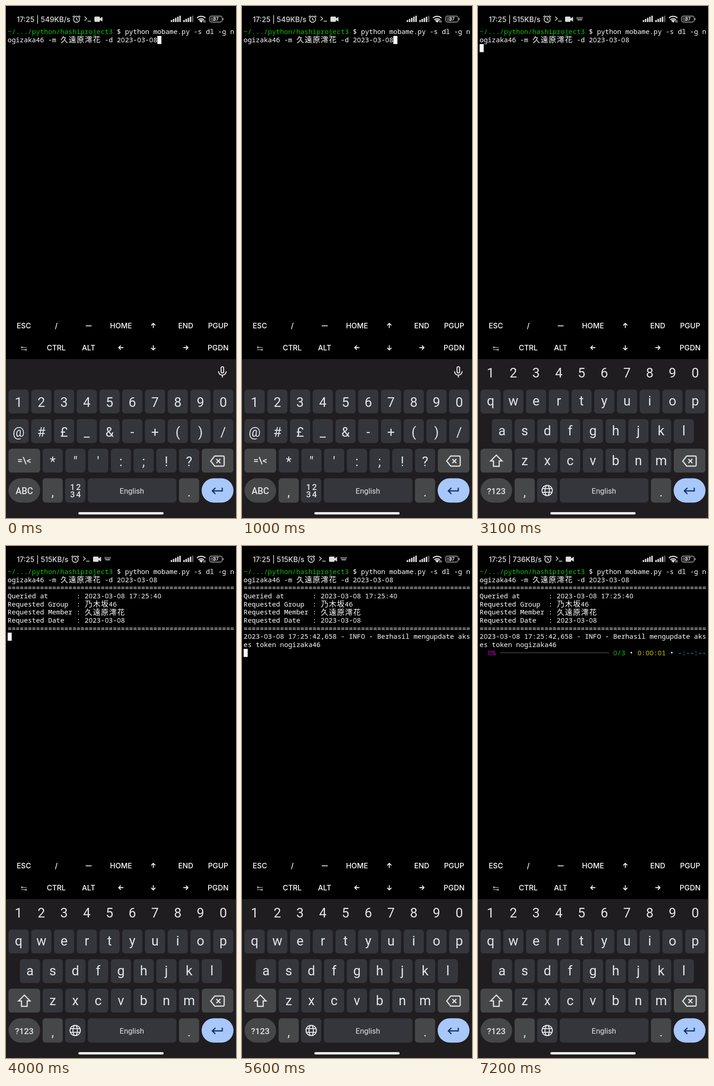
An HTML page with a canvas for the animation above (8000 ms loop, 502 by 1115 pixels).

```html
<!DOCTYPE html>
<html lang="en">
<head>
<meta charset="utf-8">
<title>Terminal session</title>
<style>
html, body { margin: 0; width: 100%; height: 100%; overflow: hidden; background: #000; }
canvas { display: block; }
</style>
</head>
<body>
<canvas id="stage" width="502" height="1115"></canvas>
<script>
const ctx = document.getElementById('stage').getContext('2d');
const LOOP = 8000;
const UI = 'Inter, Roboto, sans-serif';
const KEYS = 'Roboto, sans-serif';
const MONO = '"Noto Sans Mono", "DejaVu Sans Mono", monospace';

const WHITE = '#fff', STATUS = '#dedede', GREEN = '#00cd00';
const KEY = '#35363c', SPECIAL = '#464749', ACCENT = '#a8c7fa', LABEL = '#e3e3e8';

// ---- drawing helpers ----
function text(str, x, y, font, color, align = 'center') {
  ctx.font = font;
  ctx.fillStyle = color;
  ctx.textAlign = align;
  ctx.fillText(str, x, y);
}

function box(x, y, w, h, r, color) {
  ctx.fillStyle = color;
  ctx.beginPath();
  ctx.roundRect(x, y, w, h, r);
  ctx.fill();
}

function frame(x, y, w, h, r, color, width) {
  ctx.strokeStyle = color;
  ctx.lineWidth = width;
  ctx.beginPath();
  ctx.roundRect(x, y, w, h, r);
  ctx.stroke();
}

function line(d, color, width, x = 0, y = 0) {
  ctx.save();
  ctx.translate(x, y);
  ctx.strokeStyle = color;
  ctx.lineWidth = width;
  ctx.stroke(new Path2D(d));
  ctx.restore();
}

function shape(d, color, x = 0, y = 0) {
  ctx.save();
  ctx.translate(x, y);
  ctx.fillStyle = color;
  ctx.fill(new Path2D(d));
  ctx.restore();
}

// ---- status bar ----
function signal(x, lit) {
  for (let i = 0; i < 5; i++) {
    const h = 4.5 + i * 2.4;
    box(x + i * 4.7, 35 - h, 3.2, h, 1, i < lit ? STATUS : '#5c5c5c');
  }
}

function statusBar(speed, typing) {
  const label = `17:25 | ${speed}KB/s`;
  text(label, 23.5, 34.6, `500 15.6px ${UI}`, STATUS, 'left');
  const x = { 549: 154, 515: 151, 736: 152.5 }[speed];

  line('M-6.6 0a6.6 6.6 0 1 0 13.2 0a6.6 6.6 0 1 0 -13.2 0M0 -3.6V.4L2.8 2.2M-8.3 -5L-4.6 -8.2M8.3 -5L4.6 -8.2',
    STATUS, 1.7, x, 29);
  line('M17.5 -5l4.6 4.5l-4.6 4.5M24 5h7.5', STATUS, 1.6, x, 28);
  box(x + 39, 23, 12, 11.5, 1.8, STATUS);
  shape('M50 -1L56.5 -5.2V5.2L50 1z', STATUS, x, 28.7);
  if (typing) {
    line('M64 -2.8h14M64.5 -.2h13M66 2.4h10', '#b4b4b4', 1.7, x, 28);
    line('M67 -4v5M70 -4v5M73 -4v5M76 -4v5', '#000', .7, x, 28);
  }

  signal(359.5, 5);
  signal(387, 4);
  line('M416.8 26.2a13.5 13.5 0 0 1 18.4 0M420 30a9 9 0 0 1 12 0', STATUS, 2.5);
  shape('M421.5 31.8a6.5 6.5 0 0 1 9 0L426 36.2z', STATUS);
  line('M431.7 31v5M434.5 31v5', STATUS, 1.3);

  box(446.3, 24.2, 10.5, 8.6, 2, '#4a4a4a');
  frame(444.2, 22, 27.6, 13, 4, '#b5b5b5', 1.4);
  box(473.2, 26.5, 1.8, 4, 1, '#b5b5b5');
  text('37', 458, 32.3, `600 10px ${UI}`, WHITE);
}

// ---- terminal ----
const CELL = 8.83, ROW = 17.65, LEFT = 3.6, TOP = 47.5;
const NAME = '久遠原澪花';
const RULE = '='.repeat(56);

const command = [
  [['~/.../python/hashiproject3', GREEN], [' $ python mobame.py -s dl -g n']],
  [[`ogizaka46 -m ${NAME} -d 2023-03-08`]]
];
const query = [
  RULE,
  'Queried at       : 2023-03-08 17:25:40',
  'Requested Group  : 乃木坂46',
  'Requested Member : ' + NAME,
  'Requested Date   : 2023-03-08',
  RULE
].map(s => [[s]]);
const info = [
  '2023-03-08 17:25:42,658 - INFO - Berhasil mengupdate aks',
  'es token nogizaka46'
].map(s => [[s]]);
const progress = seconds => [
  ['  0%', '#cd00cd'], [' '], ['━'.repeat(27), '#444'], [' '],
  ['0/3', GREEN], [' • '], ['0:00:0' + seconds, '#cdcd00'], [' • '],
  ['-:--:--', '#00cdcd']
];

function printRow(row, segments) {
  const y = TOP + row * ROW;
  let col = 0;
  for (const [str, color = WHITE] of segments) {
    for (const ch of str) {
      const wide = ch > '\u2e7f';
      const span = wide ? 2 : 1;
      const x = LEFT + col * CELL;
      if (ch === '━') {
        ctx.fillStyle = color;
        ctx.fillRect(x, y + 7.6, CELL, 1.6);
      } else if (ch !== ' ') {
        const font = wide ? '16.4px "Noto Sans CJK JP", "Noto Sans CJK", sans-serif'
          : ch === '0' ? '14.7px "Open Sans", sans-serif'   // plain, undotted zero
          : `14.7px ${MONO}`;
        text(ch, x + span * CELL / 2, y + 13.6 + (wide ? .6 : 0), font, color);
      }
      col += span;
    }
  }
}

function terminal(t) {
  const rows = [...command];
  if (t >= 4000) rows.push(...query);
  if (t >= 5600) rows.push(...info);
  if (t >= 6100) rows.push(progress(t >= 7100 ? 1 : 0));
  rows.forEach((segments, i) => printRow(i, segments));
  if (t < 6100) {
    const [col, row] = t < 2000 ? [37, 1] : [0, rows.length];
    ctx.fillStyle = WHITE;
    ctx.fillRect(LEFT + col * CELL, TOP + row * ROW, CELL, ROW);
  }
}

// ---- extra key rows ----
const ARROW = 'M0 5.2V-4.6M-4.6 -.4L0 -5L4.6 -.4';

function arrow(x, y, turns) {
  ctx.save();
  ctx.translate(x, y);
  ctx.rotate(turns * Math.PI / 2);
  line(ARROW, WHITE, 1.8);
  ctx.restore();
}

function extraKeys() {
  const rows = [
    ['ESC', '/', '', 'HOME', '', 'END', 'PGUP'],
    ['', 'CTRL', 'ALT', '', '', '', 'PGDN']
  ];
  rows.forEach((row, r) => row.forEach((label, c) =>
    text(label, 39 + c * 70.65, 702 + r * 48, `500 15.9px ${UI}`, WHITE)));
  line('M174 696.5h13', WHITE, 1.7);
  arrow(321.5, 696, 0);
  arrow(251, 744, 3);
  arrow(321.5, 744, 2);
  arrow(392.3, 744, 1);
  line('M-5.5 -5v5M-4.5 -2.5H6M-2 -4.8L-4.4 -2.5L-2 -.2M5.5 0v5M4.5 2.5H-6M2 .2L4.4 2.5L2 4.8',
    '#d5d5d5', 1, 39, 746);
}

// ---- keyboard ----
const PITCH = 49.62, KEY_W = 44, KEY_H = 52;
const rowY = r => 835.3 + r * 64.4;

function keyRow(chars, x, row, drop) {
  [...chars].forEach((ch, i) => {
    const kx = x + i * PITCH;
    box(kx, rowY(row), KEY_W, KEY_H, 6.5, KEY);
    text(ch, kx + KEY_W / 2, rowY(row) + 26 + drop, `29px ${KEYS}`, LABEL);
  });
}

function keyboard(letters) {
  ctx.fillStyle = '#1f1d20';
  ctx.fillRect(0, 769, 502, 346);

  if (letters) {
    [...'1234567890'].forEach((d, i) =>
      text(d, 27.5 + i * PITCH, 809, `29px ${KEYS}`, LABEL));
    keyRow('qwertyuiop', 5.5, 0, 8.7);
    keyRow('asdfghjkl', 30.3, 1, 9.5);
    keyRow('zxcvbnm', 79.9, 2, 9.5);
  } else {
    frame(469.4, 785.5, 5.6, 13.5, 2.8, LABEL, 2.2);
    line('M463.8 795.5a8.4 8.4 0 0 0 16.8 0M472.2 804v5', LABEL, 2.2);
    keyRow('1234567890', 5.5, 0, 12);
    keyRow('@#£_&-+()/', 5.5, 1, 12);
    keyRow('*"\':;!?', 79.9, 2, 12);
  }

  // third row ends
  const y3 = rowY(2), y4 = rowY(3);
  box(5.5, y3, 69, KEY_H, 6.5, SPECIAL);
  box(427.3, y3, 69, KEY_H, 6.5, SPECIAL);
  line('M455.5 980h18.2a2.5 2.5 0 0 1 2.5 2.5v17a2.5 2.5 0 0 1 -2.5 2.5h-18.2L446.8 991zM459.2 986.7l8.6 8.6M467.8 986.7l-8.6 8.6',
    LABEL, 2.5);
  if (letters) line('M40 978L27.5 990.8H33.8V1002.6H46.2V990.8H52.5z', LABEL, 2.5);
  else text('=\\<', 40, 996.5, `500 20.5px ${KEYS}`, LABEL);

  // bottom row
  box(5.5, y4, 69, KEY_H + 1, 26.5, SPECIAL);
  box(79.9, y4, KEY_W, KEY_H + 1, 6.5, SPECIAL);
  box(129, y4, KEY_W, KEY_H + 1, 6.5, KEY);
  box(178.5, y4, 193.5, KEY_H + 1, 6.5, KEY);
  box(377.5, y4, KEY_W, KEY_H + 1, 6.5, SPECIAL);
  box(427, y4, 69.5, KEY_H + 1, 26.5, ACCENT);

  if (letters) {
    text('?123', 40, 1062.5, `500 18.5px ${KEYS}`, LABEL);
    line('M-11.3 0a11.3 11.3 0 1 0 22.6 0a11.3 11.3 0 1 0 -22.6 0M-4.8 0a4.8 11.3 0 1 0 9.6 0a4.8 11.3 0 1 0 -9.6 0M-10.5 -4h21M-10.5 4h21',
      LABEL, 2.1, 151, 1055);
  } else {
    text('ABC', 40, 1063, `500 19.5px ${KEYS}`, LABEL);
    [...'1234'].forEach((d, i) =>
      text(d, 145 + i % 2 * 13, 1053.5 + (i >> 1) * 16.5, `500 18px ${KEYS}`, LABEL));
  }
  text(',', 102, 1068, `27px ${KEYS}`, LABEL);
  text('.', 399.5, 1068, `27px ${KEYS}`, LABEL);
  text('English', 274.7, 1062, `16.5px ${KEYS}`, LABEL);
  line('M472 1049v7H450.5M457 1049.3L450.3 1056L457 1062.7', '#0b2f68', 2.5);

  box(158, 1102.3, 186, 5, 2.5, WHITE);
}

function draw() {
  const t = performance.now() % LOOP;
  ctx.fillStyle = '#000';
  ctx.fillRect(0, 0, 502, 1115);
  const speed = t < 3000 ? 549 : t < 7000 ? 515 : 736;
  statusBar(speed, speed === 515);
  terminal(t);
  extraKeys();
  keyboard(t >= 1900);
  requestAnimationFrame(draw);
}
draw();
</script>
</body>
</html>
```
